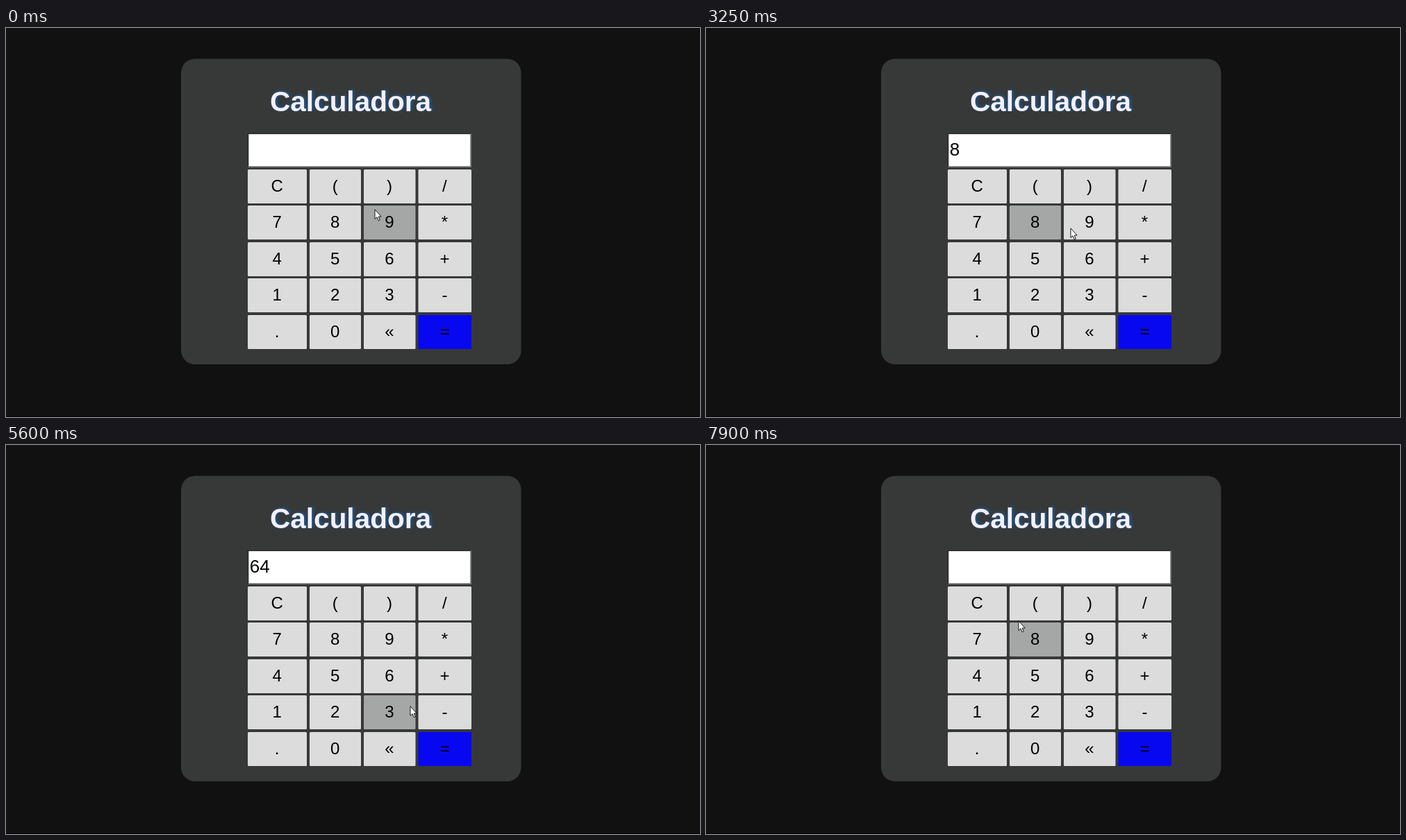
Recreate the animation shown at these times as an HTML page with a canvas. Size 999x561 px, loop 8 s.

```html
<!DOCTYPE html>
<html lang="pt">
<head>
<meta charset="utf-8">
<title>Calculadora</title>
<style>
  html, body { margin: 0; width: 100%; height: 100%; overflow: hidden; background: #111; }
  canvas { display: block; }
</style>
</head>
<body>
<canvas id="stage" width="999" height="561"></canvas>
<script>
const ctx = document.getElementById('stage').getContext('2d');
const FONT = '"Liberation Sans", Arial, sans-serif';
const LOOP = 8000, STEP = 50, HOVER_LAG = 20;
const FOCUS = 1100, BLUR = 2950, BLINK = 500;

const ROWS = ['C()/', '789*', '456+', '123-', '.0«='];
const COLS = [[348, 85], [437, 74], [515, 74.5], [593.5, 76.5]]; // left, width
const KEY_H = 49;
const rowTop = r => Math.round(203.7 + r * 52.5);

// pointer glides: begin, end, x, y; it rests in between
const GLIDES = [
  [0, 50, 495, 270],
  [350, 550, 395, 325], [550, 800, 449, 199],
  [1600, 1950, 536, 253], [1950, 2150, 500, 430], [2150, 2350, 395, 335],
  [2400, 2750, 475, 284],
  [3200, 3250, 524, 289], [3300, 3600, 632, 284],
  [3800, 4300, 482, 285],
  [4550, 4700, 536, 338], [4700, 5150, 628, 435],
  [5450, 5600, 581, 377], [5600, 5850, 495, 370], [5850, 6050, 545, 360],
  [6100, 6250, 485, 225], [6350, 6400, 496, 270], [6400, 6850, 552, 435],
  [7250, 7900, 449, 254]
];
const PRESSES = [[2950, '8'], [3800, '*'], [4400, '8'], [5300, '='], [7000, '«'], [7200, '«']];

function pointerAt(t) {
  let x = 530, y = 262;
  for (const [begin, end, toX, toY] of GLIDES) {
    if (t <= begin) break;
    const k = Math.min(1, (t - begin) / (end - begin));
    x += (toX - x) * k;
    y += (toY - y) * k;
  }
  return [x, y];
}

function press(text, key) {
  if (key === '«') return text.slice(0, -1);
  if (key === '=') return String(text.split('*').reduce((a, b) => a * b));
  return text + key;
}

const entryAt = t => PRESSES.filter(p => p[0] <= t).reduce((text, p) => press(text, p[1]), '');

function rounded(x, y, w, h, r, color) {
  ctx.fillStyle = color;
  ctx.beginPath();
  ctx.roundRect(x, y, w, h, r);
  ctx.fill();
}

function polygon(points, color) {
  ctx.fillStyle = color;
  ctx.beginPath();
  points.forEach(([x, y]) => ctx.lineTo(x, y));
  ctx.closePath();
  ctx.fill();
}

function drawTitle() {
  ctx.save();
  ctx.font = `bold 40.5px ${FONT}`;
  ctx.textAlign = 'center';
  ctx.shadowColor = '#1d5b96';
  ctx.shadowOffsetX = 2;
  ctx.shadowOffsetY = -1;
  ctx.shadowBlur = 4;
  ctx.fillStyle = '#f3f0ff';
  ctx.fillText('Calculadora', 496, 120);
  ctx.restore();
}

function drawDisplay(t) {
  const x = 347.6, y = 151.4, r = 670, b = 201;
  const focused = t >= FOCUS && t < BLUR;
  const w = focused ? 2 : 1.7;
  ctx.fillStyle = focused ? '#0f50cc' : '#2b2b2b';
  ctx.fillRect(x, y, r - x, b - y);
  if (!focused) {
    polygon([[r, y], [r, b], [x, b], [x + w, b - w], [r - w, b - w], [r - w, y + w]], '#737573');
  }
  ctx.fillStyle = '#fff';
  ctx.fillRect(x + w, y + w, r - x - 2 * w, b - y - 2 * w);

  ctx.fillStyle = '#000';
  ctx.font = `26px ${FONT}`;
  ctx.textAlign = 'left';
  ctx.fillText(entryAt(t), 350.8, 184);
  if (focused && Math.floor((t - FOCUS) / BLINK) % 2 === 0) ctx.fillRect(351, 161, 1, 29);
}

function drawKeys(px, py) {
  ctx.font = `24px ${FONT}`;
  ctx.textAlign = 'center';
  ROWS.forEach((row, r) => COLS.forEach(([x, w], c) => {
    const y = rowTop(r), label = row[c];
    const hover = px >= x && px <= x + w && py >= y && py <= y + KEY_H;
    const color = hover ? '#a5a7a6' : label === '=' ? '#0808f0' : '#dcdcdc';
    rounded(x, y, w, KEY_H, 1.5, color);
    ctx.fillStyle = '#000';
    ctx.fillText(label, x + w / 2 - 0.3, y + 32);
  }));
}

function drawPointer(x, y) {
  ctx.save();
  ctx.translate(Math.round(x) + 1, Math.round(y) - 0.2);
  polygon([[0, 0], [0, 13.6], [3, 10.9], [5.2, 16], [7.3, 15.1], [5.2, 10.2], [9.2, 10.2]], '#fff');
  ctx.lineWidth = 0.9;
  ctx.strokeStyle = '#000';
  ctx.stroke();
  ctx.restore();
}

function draw(now) {
  const t = Math.floor((now % LOOP) / STEP) * STEP;
  ctx.fillStyle = '#111';
  ctx.fillRect(0, 0, 999, 561);
  ctx.fillStyle = '#000';
  ctx.fillRect(0, 560, 999, 1);
  rounded(252, 44.4, 489.5, 440.6, 20, '#373938');
  drawTitle();
  drawDisplay(t);
  drawKeys(...pointerAt(t - HOVER_LAG));
  drawPointer(...pointerAt(t));
}

let start;
function tick(now) {
  start ??= now;
  draw(now - start);
  requestAnimationFrame(tick);
}
draw(0);
requestAnimationFrame(tick);
</script>
</body>
</html>
```
